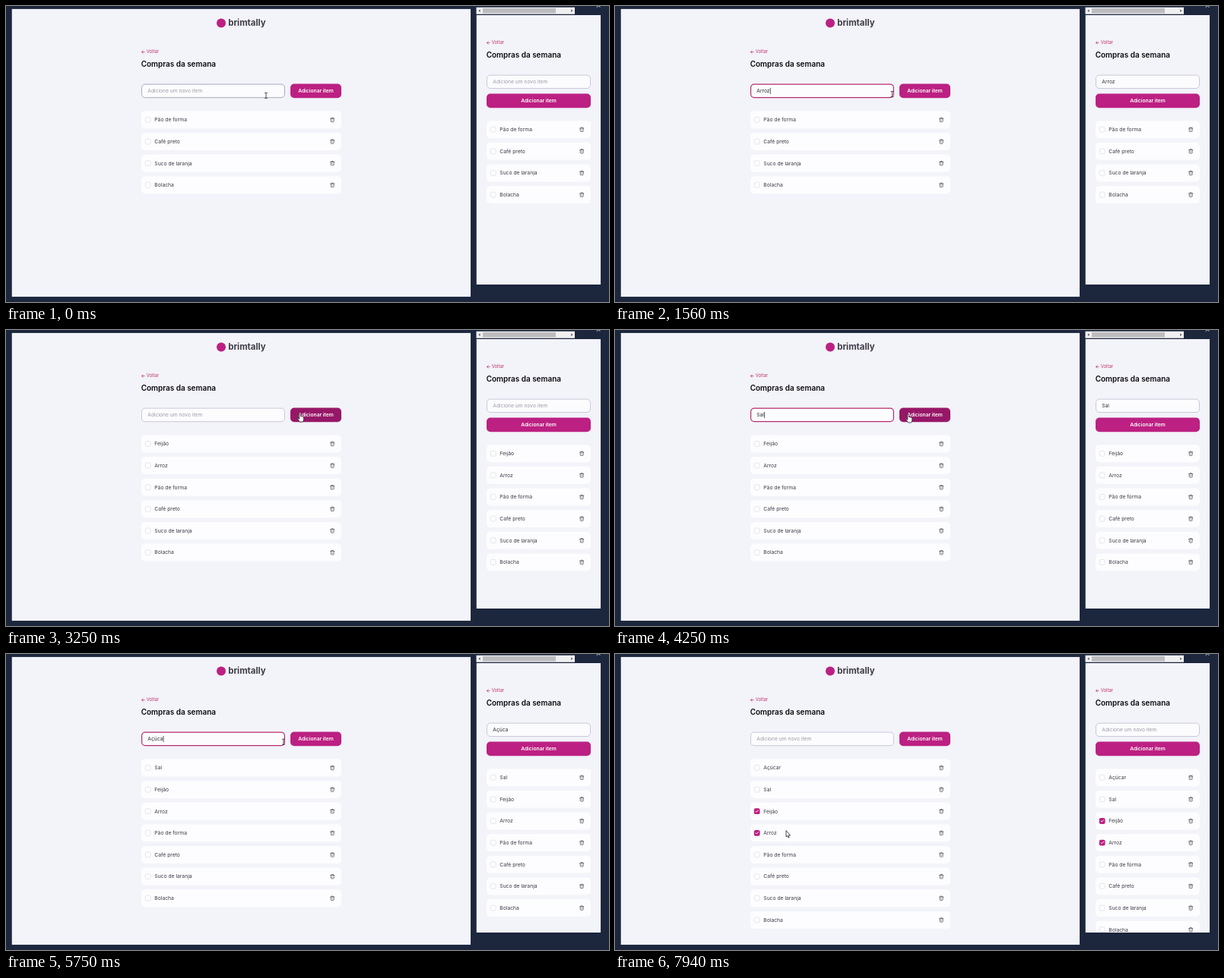
Animation of 793x390 px, one loop 8 s. Source, as an HTML page with a canvas:

```html
<!DOCTYPE html>
<html lang="pt-BR">
<head>
<meta charset="utf-8">
<title>Compras da semana</title>
<style>
  html, body { margin: 0; width: 100%; height: 100%; overflow: hidden; background: #1c263c; }
  canvas { display: block; }
</style>
</head>
<body>
<canvas id="stage" width="793" height="390"></canvas>
<script>
const ctx = document.getElementById('stage').getContext('2d');
const LOOP = 8000;
const PINK = '#bc2082', PAGE = '#f3f3fa', INK = '#3b3845';
const ROW_STEP = 28.64, ERROR_SHIFT = 8.4;
const ERROR_TIME = [460, 960];

const initialItems = ['Pão de forma', 'Café preto', 'Suco de laranja', 'Bolacha'];

// Each entry: the text, when its characters appear, and when it is submitted.
const entries = [
  { text: 'Arroz', focus: 900, keys: [960, 1080, 1220, 1340, 1480], submit: 1760 },
  { text: 'Feijão', focus: 2040, keys: [2100, 2230, 2360, 2480, 2670, 2790], submit: 3190 },
  { text: 'Sal', focus: 3520, keys: [3620, 3760, 3900], submit: 4380 },
  { text: 'Açúcar', focus: 4920, keys: [5040, 5230, 5430, 5580, 5710, 5830], submit: 6560 }
];
const checkedAt = { 'Feijão': 7350, 'Arroz': 7640 };

// Pointer path: time, x, y
const path = [
  [0, 342, 118], [60, 342, 118], [380, 392, 114], [600, 392, 114], [750, 366, 117],
  [920, 346, 117], [1460, 346, 117], [1680, 388, 115], [1800, 388, 115], [2030, 348, 117],
  [2830, 348, 117], [3060, 387, 115], [3240, 387, 115], [3500, 347, 117],
  [3930, 347, 117], [4180, 386, 116], [4440, 386, 116], [4860, 346, 117],
  [5590, 346, 117], [5940, 389, 114], [6600, 389, 114], [6880, 320, 143],
  [7290, 187, 207], [7400, 187, 207], [7590, 187, 236], [7700, 187, 236],
  [7920, 225, 237], [LOOP, 225, 237]
];

const desktop = {
  panel: [7.5, 3.8, 603.7, 379.5], left: 178, backY: 60.6, titleY: 77.3,
  input: [178, 102.6, 189, 18.6], button: [374, 102.6, 67, 18.6],
  rowsY: 149.9, rowWidth: 263, errorY: 126.7, errorX: 181
};
const mobile = {
  panel: [618.5, 12, 163.7, 355], left: 632, backY: 48.4, titleY: 65.3,
  input: [632, 90.6, 137, 18.4], button: [632, 115.6, 137, 18.6],
  rowsY: 162.7, rowWidth: 137, errorY: 114.2, errorX: 635.5, stacked: true
};

function pointerAt(t) {
  const i = Math.max(1, path.findIndex(p => p[0] >= t));
  const [t0, x0, y0] = path[i - 1], [t1, x1, y1] = path[i];
  const u = Math.max(0, (t - t0) / (t1 - t0)), k = u * u * (3 - 2 * u);
  return [x0 + (x1 - x0) * k, y0 + (y1 - y0) * k];
}

const inside = ([px, py], [x, y, w, h]) => px >= x && px <= x + w && py >= y && py <= y + h;

// Share of the last 150 ms spent over the button: a linear hover fade.
function hoverAmount(t) {
  let hits = 0;
  for (let i = 0; i < 10; i++) hits += inside(pointerAt(Math.max(0, t - i * 15)), desktop.button);
  return hits / 10;
}

function stateAt(t) {
  const added = entries.filter(e => t >= e.submit).map(e => e.text).reverse();
  const active = entries.find(e => t >= e.focus && t < e.submit);
  const typed = active ? active.keys.filter(k => t >= k).length : 0;
  return {
    items: [...added, ...initialItems],
    focused: !!active,
    value: active ? active.text.slice(0, typed) : '',
    lastKey: active ? (active.keys[typed - 1] || active.focus) : 0,
    error: t >= ERROR_TIME[0] && t < ERROR_TIME[1],
    hover: hoverAmount(t),
    pointer: pointerAt(t)
  };
}

function text(str, x, y, size, color, weight = 400, align = 'left') {
  ctx.font = `${weight} ${size}px Inter, sans-serif`;
  ctx.textAlign = align;
  ctx.textBaseline = 'middle';
  ctx.fillStyle = color;
  ctx.fillText(str, x, y);
}

// The border lies inside the given rectangle.
function box([x, y, w, h], r, fill, stroke, width = 1) {
  const inset = stroke ? width / 2 : 0;
  ctx.beginPath();
  ctx.roundRect(x + inset, y + inset, w - 2 * inset, h - 2 * inset, Math.max(0, r - inset));
  if (fill) { ctx.fillStyle = fill; ctx.fill(); }
  if (stroke) { ctx.strokeStyle = stroke; ctx.lineWidth = width; ctx.stroke(); }
}

function drawPath(d, x, y, { fill, stroke, width = 1 }) {
  const shape = new Path2D(d);
  ctx.save();
  ctx.translate(x, y);
  ctx.lineWidth = width;
  ctx.lineJoin = ctx.lineCap = 'round';
  if (fill) { ctx.fillStyle = fill; ctx.fill(shape); }
  if (stroke) { ctx.strokeStyle = stroke; ctx.stroke(shape); }
  ctx.restore();
}

function drawRow(name, x, y, width, t) {
  box([x, y - 11.5, width, 23], 5, '#fdfdff');
  const mark = [x + 4.8, y - 3.9, 7.8, 7.8];
  if (t >= checkedAt[name]) {
    box(mark, 2.2, PINK);
    drawPath('M-1.7 0 L-.5 1.2 L1.8-1.3', x + 8.7, y, { stroke: '#fff', width: .9 });
  } else {
    box(mark, 2.5, '#fdfdff', '#e0dfe9', .8);
  }
  text(name, x + 17.3, y + .3, 6.75, INK);
  const ink = '#4d4957';
  drawPath('M-2.6-1.7H2.6 M-1-1.9V-2.7H1V-1.9 M-2-1.6V2Q-2 2.8-1.2 2.8H1.2Q2 2.8 2 2V-1.6',
    x + width - 11.8, y, { stroke: ink, width: .7 });
  drawPath('M-.6 0V1.3 M.6 0V1.3', x + width - 11.8, y, { stroke: ink, width: .35 });
}

function drawInput(view, s, t) {
  const [x, y, w, h] = view.input, cy = y + h / 2 + .2;
  const isDesktop = !view.stacked;
  let border = '#c9c8d8', width = 1;
  if (isDesktop && inside(s.pointer, view.input)) border = '#aaa8b8';
  if (s.error) { border = '#ae3058'; width = 1.2; }
  else if (isDesktop && s.focused) { border = '#b92d70'; width = 1.2; }
  box(view.input, 5, '#fcfcff', border, width);
  text(s.value || 'Adicione um novo item', x + 8.3, cy, 6.7, s.value ? '#2d2a36' : '#9b99a6');
  if (isDesktop && s.focused && (t - s.lastKey) % 1000 < 500) {
    const caretX = x + 8.6 + (s.value ? ctx.measureText(s.value).width : 0);
    ctx.fillStyle = '#333';
    ctx.fillRect(caretX, cy - 4.2, .8, 8.2);
  }
}

function drawButton(view, s) {
  const [x, y, w, h] = view.button;
  const top = y + (view.stacked && s.error ? ERROR_SHIFT : 0);
  const k = view.stacked ? 0 : s.hover;
  const mix = (a, b) => Math.round(a + (b - a) * k);
  box([x, top, w, h], 5, `rgb(${mix(188, 151)},${mix(32, 23)},${mix(130, 103)})`);
  text('Adicionar item', x + w / 2, top + h / 2 + .2, 6.7, '#fff', 600, 'center');
}

function drawView(view, s, t) {
  ctx.save();
  ctx.beginPath();
  ctx.rect(...view.panel);
  ctx.clip();
  box(view.panel, 0, PAGE);
  if (!view.stacked) {
    ctx.beginPath();
    ctx.arc(283, 22.5, 6, 0, 7);
    ctx.fillStyle = PINK;
    ctx.fill();
    text('brimtally', 292.2, 22.5, 11.4, '#403d48', 700);
  }
  drawPath('M4.2 0H.5 M2.2-1.7L.5 0L2.2 1.7', view.left, view.backY, { stroke: '#bd3470', width: .75 });
  text('Voltar', view.left + 6.7, view.backY + .1, 5.9, '#bd3470');
  text('Compras da semana', view.left - .3, view.titleY, 9.95, '#0c0a10', 600);
  drawInput(view, s, t);
  drawButton(view, s);
  if (s.error) text('* Campo obrigatório!', view.errorX, view.errorY, 6.05, '#b92d5c', 600);
  const first = view.rowsY + (s.error ? ERROR_SHIFT : 0);
  s.items.forEach((name, i) => drawRow(name, view.left, first + i * ROW_STEP, view.rowWidth, t));
  ctx.restore();
}

function drawScrollbar() {
  box([618.5, 1.8, 129.5, 9], 0, '#f0f0f1');
  box([627, 3, 96, 6.5], 0, '#bdbdc0');
  drawPath('M1-1.7L-1 0L1 1.7Z', 622.5, 6.2, { fill: '#444' });
  drawPath('M-1-1.7L1 0L-1 1.7Z', 744.3, 6.2, { fill: '#444' });
  drawPath('M-2 1.5L0-.5L2 1.5', 779, 0, { stroke: '#e3e5ec', width: 1 });
}

function drawPointer(pos) {
  const [x, y] = pos;
  if (inside(pos, desktop.button)) {
    drawPath('M-1.3-4.5Q-.4-5.5.4-4.5V-1.3Q1.4-2 2-1Q3-1.6 3.5-.6Q4.8-.8 4.8.5V3Q4.5 4.6 3.6 6H-.5Q-2 3.7-3.5 1.8Q-3.2.5-1.3 2Z',
      x, y, { fill: '#fff', stroke: '#222', width: .8 });
  } else if (inside(pos, desktop.input)) {
    drawPath('M-1.5-3.6H-.4L0-3.2L.4-3.6H1.5 M0-3.2V3.2 M-1.5 3.6H-.4L0 3.2L.4 3.6H1.5',
      x, y, { stroke: '#222', width: .8 });
  } else {
    drawPath('M0-4V4L1.8 2.4L3 5.1L4.2 4.5L3.1 1.9H5.2Z', x, y, { fill: '#fff', stroke: '#222', width: .8 });
  }
}

function draw(now) {
  const t = now % LOOP, s = stateAt(t);
  box([0, 0, 793, 390], 0, '#1c263c');
  drawView(desktop, s, t);
  drawView(mobile, s, t);
  drawScrollbar();
  drawPointer(s.pointer);
}

const start = performance.now();
(function tick() {
  draw(performance.now() - start);
  requestAnimationFrame(tick);
})();
</script>
</body>
</html>
```
